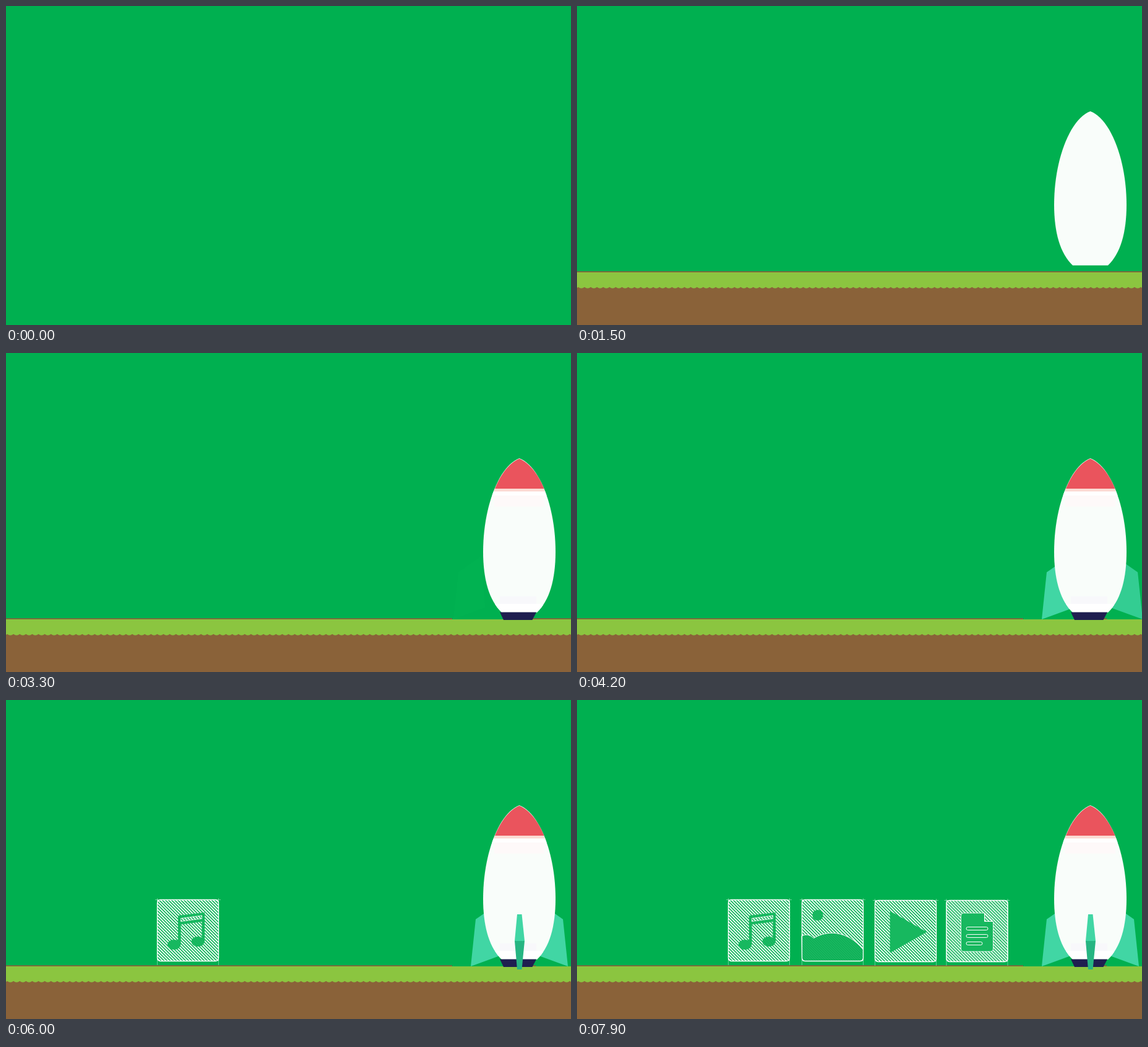
Recreate the animation shown at these times as an HTML page. Size 913 by 515 pixels, loop 8 s.

```html
<!DOCTYPE html>
<html lang="en">
<head>
<meta charset="utf-8">
<title>Rocket and media tiles</title>
<style>
  html, body { margin: 0; width: 100%; height: 100%; overflow: hidden; background: #00b050; }
  svg { display: block; width: 100%; height: 100%; }
</style>
</head>
<body>
<svg id="stage" viewBox="0 0 913 515">
  <defs>
    <pattern id="hatch" width="5" height="5" patternUnits="userSpaceOnUse">
      <path d="M-2-2L7 7M-2 3L2 7M3-2L7 2" stroke="#fff" stroke-width="1.6"/>
    </pattern>
    <pattern id="shade" width="4" height="4" patternUnits="userSpaceOnUse">
      <path d="M-1-1L5 5" stroke="#0da653" stroke-width="1"/>
    </pattern>
    <path id="hull" d="M829.5 170C797 182 771 248 771 321C771 366 781 400 801 418.7H858C878 400 888 366 888 321C888 248 862 182 829.5 170Z"/>
    <clipPath id="hullClip"><use href="#hull"/></clipPath>
    <path id="fin" d="M751 430L759 354L796 328L803 411Z" fill="#41d6a4"/>
  </defs>

  <rect width="913" height="515" fill="#00b050"/>
  <rect id="soil" y="428.3" width="913" height="87" fill="#8a6239"/>
  <path id="grass" fill="#8bc540"/>
  <rect id="gapLeft" x="721" y="428" width="82" height="2" fill="#00b050"/>
  <rect id="gapRight" x="856" y="428" width="57" height="2" fill="#00b050"/>

  <g id="finLeft"><use href="#fin"/></g>
  <g id="finRight"><use href="#fin" transform="matrix(-1 0 0 1 1659 0)"/></g>
  <g id="body"><use href="#hull" fill="#f9fdfa"/></g>
  <g clip-path="url(#hullClip)">
    <g id="blush">
      <path d="M780 223H880V230H780Z" fill="#fff"/>
      <path d="M789 230H870V248H789Z" fill="#fef9f9"/>
    </g>
    <g id="haze">
      <path d="M798 393H857V405H798Z" fill="#f8f8fb"/>
      <path d="M790 405H868V419H790Z" fill="#fff"/>
    </g>
  </g>
  <path id="nose" d="M829.5 170.8C813.5 177 799.5 196 790 219H869.5C860 196 845.5 177 829.5 170.8Z" fill="#ea545d"/>
  <path id="band" d="M789.5 219H869.5L871 223.5H788Z" fill="#fbdad3"/>
  <path id="tail" d="M798 418.5H857L850.5 431H804Z" fill="#1f1f50"/>
  <path id="keelTop" d="M826 346H833.5L838 389H822Z" fill="#41d6a4"/>
  <path id="keelLow" d="M822 389H838L833.5 435H826Z" fill="#26b582"/>
  <g id="tiles"></g>
</svg>
<script>
const LOOP = 8000, STEP = 100, SHIFT = 29;
const $ = id => document.getElementById(id);

// Grass strip with a scalloped lower edge
const BUMP = 10.1;
let edge = "M0 430H913V455";
for (let x = 911; x > -BUMP; x -= BUMP)
  edge += `L${x.toFixed(1)} 453.7Q${(x - BUMP / 2).toFixed(1)} 457.6 ${(x - BUMP).toFixed(1)} 453.7`;
$("grass").setAttribute("d", edge + "Z");

const GREEN = "#17b85f";
const pill = (y, w) =>
  `<rect x="32.5" y="${y}" width="${w}" height="5" rx="2.5" fill="${GREEN}" stroke="#fff"/>`;
const hill = "M0 59Q10 53.5 19.5 62.5C42 49 74 50 99.5 81V95Q99.5 99.5 95 99.5H5Q.5 99.5 .5 95Z";

const icons = {
  music: `<path fill="${GREEN}" fill-rule="evenodd" d="M34 26L77 21V68H72.5V36L38.5 40.5V73H34ZM38.5 30.5V35.5L72.5 31V26Z"/>
    <path d="M38.5 30.5V35.5L72.5 31V26Z" fill="none" stroke="#fff" stroke-width=".7"/>
    <ellipse cx="27.5" cy="73" rx="10.5" ry="8" fill="${GREEN}"/>
    <ellipse cx="66" cy="68" rx="10.5" ry="8" fill="${GREEN}"/>`,
  image: `<circle cx="26" cy="25.3" r="8.6" fill="${GREEN}"/>
    <path d="${hill}" fill="${GREEN}"/>
    <path d="${hill}" fill="url(#shade)" stroke="#fff" stroke-width=".9"/>`,
  video: `<path d="M25.5 19L82.5 51.5L25.5 84Z" fill="${GREEN}" stroke="${GREEN}" stroke-width="1.5" stroke-linejoin="round"/>`,
  text: `<path d="M28 21H62L76 34.5V79Q76 83 72 83H28Q24 83 24 79V25Q24 21 28 21Z" fill="${GREEN}" stroke="#fff" stroke-width=".8"/>
    <path d="M62 21V34.5H76Z" fill="url(#hatch)" stroke="#fff"/>
    ${pill(43.5, 35)}${pill(55.5, 35)}${pill(67.5, 26)}`
};

function addTile(id, x, y) {
  $("tiles").insertAdjacentHTML("beforeend", `<g id="${id}"><g transform="translate(${x} ${y})">
    <rect width="100" height="100" fill="${GREEN}"/>
    <rect width="100" height="100" rx="4" fill="url(#hatch)"/>
    ${icons[id]}
    <rect x=".5" y=".5" width="99" height="99" rx="5" fill="none" stroke="#fff" stroke-width="1.3"/>
    <path d="M-3 .5H103M.5-2V106M99.5-2V106" stroke="#fff" stroke-opacity=".4"/>
  </g></g>`);
}
addTile("music", 244, 322);
addTile("image", 363, 322);
addTile("video", 481, 323);
addTile("text", 596.5, 323);

// id, start, horizontal and vertical entry direction, duration, first visible time
const entries = [
  ["grass", 200, 0, 0, 380],
  ["soil", 525, 0, 0, 375],
  ["body", 1000, 0, 0],
  ["nose", 1830, 0, -1],
  ["band", 2215, 0, 1],
  ["tail", 2730, 0, -1],
  ["finLeft", 3290, -1, 0],
  ["finRight", 3805, 1, 0, 500, 4000],
  ["keelTop", 4415, 0, -1],
  ["keelLow", 4960, 0, 1],
  ["music", 5455, -1, 0],
  ["image", 6180, -1, 0],
  ["video", 6745, -1, 0],
  ["text", 7410, -1, 0]
].map(([id, start, dx, dy, span = 500, from = 0]) => ({ node: $(id), start, dx, dy, span, from }));

// Parts that switch on at once
const switches = [["blush", 2300], ["haze", 2800], ["gapLeft", 3300], ["gapRight", 4000]]
  .map(([id, at]) => ({ node: $(id), at }));

function draw(time) {
  const t = Math.floor((time % LOOP) / STEP) * STEP;
  for (const { node, start, dx, dy, span, from } of entries) {
    let p = t < from ? 0 : Math.min(1, Math.max(0, (t - start) / span));
    if (p > 0.96) p = 1;
    const rest = SHIFT * (1 - p);
    node.setAttribute("opacity", p);
    node.setAttribute("transform", `translate(${dx * rest} ${dy * rest})`);
  }
  for (const { node, at } of switches) node.setAttribute("opacity", t >= at ? 1 : 0);
}

const origin = performance.now();
function tick() {
  draw(performance.now() - origin);
  requestAnimationFrame(tick);
}
tick();
</script>
</body>
</html>
```
